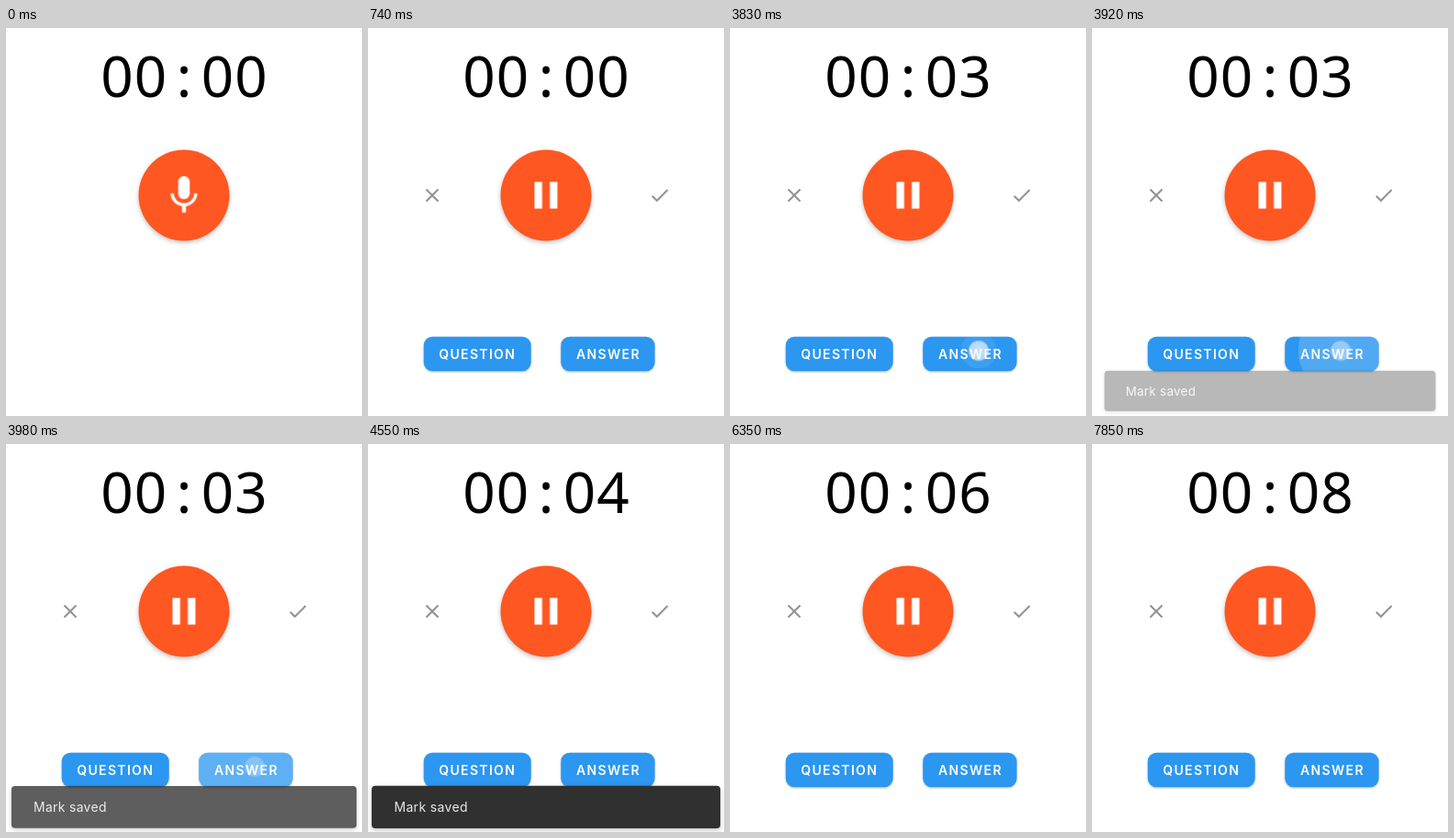
Animation, 388 px wide and 422 px high, one loop 8000 ms. Source, as an HTML page:

```html
<!DOCTYPE html>
<html lang="en">
<head>
<meta charset="utf-8">
<title>Voice recorder</title>
<style>
  html, body { margin: 0; width: 100%; height: 100%; overflow: hidden; background: #fff; }
  svg { display: block; width: 388px; height: 422px; }

  .clock { font: 400 62px "Noto Sans", "Open Sans", sans-serif; font-stretch: 94%; text-anchor: middle; }
  .label { font: 600 14px Inter, Roboto, sans-serif; letter-spacing: 1.35px; fill: #fff; }
  .note { font: 400 14px Inter, Roboto, sans-serif; letter-spacing: .35px; fill: #e8e8e8; }
  .raised { filter: drop-shadow(0 2px 2.5px rgba(0, 0, 0, .25)); }
  .low { filter: drop-shadow(0 1px 1px rgba(0, 0, 0, .22)); }

  .reel, .idle, .active, .dot, .ripple, .snack {
    animation: 8s linear infinite;
    transform-box: fill-box;
    transform-origin: center;
  }
  .reel { animation-name: count; animation-timing-function: step-end; }
  .idle { animation-name: leave; animation-timing-function: step-end; }
  .active { animation-name: enter; animation-timing-function: step-end; }
  .dot.start { animation-name: start-dot; }
  .ripple.start { animation-name: start-ripple; }
  .dot.mark { animation-name: mark-dot; }
  .ripple.mark { animation-name: mark-ripple; }
  .snack { animation-name: snack-fade, snack-grow; }

  /* one second of the counter takes 900 ms */
  @keyframes count {
    0% { transform: translateY(0); }
    19% { transform: translateY(-70px); }
    30.25% { transform: translateY(-140px); }
    41.5% { transform: translateY(-210px); }
    52.75% { transform: translateY(-280px); }
    64% { transform: translateY(-350px); }
    75.25% { transform: translateY(-420px); }
    86.5% { transform: translateY(-490px); }
    97.75%, 100% { transform: translateY(-560px); }
  }
  @keyframes leave { 0% { opacity: 1; } 7.75%, 100% { opacity: 0; } }
  @keyframes enter { 0% { opacity: 0; } 7.75%, 100% { opacity: 1; } }

  @keyframes start-dot {
    0%, 6.2% { opacity: 0; }
    7%, 8.125% { opacity: 1; }
    9.25%, 100% { opacity: 0; }
  }
  @keyframes start-ripple {
    0%, 6.75% { opacity: 0; transform: scale(.2); }
    8.25% { opacity: .24; transform: scale(1); }
    9.25%, 100% { opacity: 0; transform: scale(1); }
  }
  @keyframes mark-dot {
    0%, 45.5% { opacity: 0; }
    46.375%, 47.875% { opacity: 1; }
    49.75%, 51.62% { opacity: .4; }
    51.625%, 100% { opacity: 0; }
  }
  @keyframes mark-ripple {
    0%, 47.125% { opacity: 0; transform: scale(.12); }
    47.875% { opacity: .08; transform: scale(.3); }
    49.75%, 51.62% { opacity: .24; transform: scale(1); }
    51.625% { opacity: .18; }
    52.75%, 100% { opacity: 0; transform: scale(1); }
  }
  @keyframes snack-fade {
    0%, 48.4375% { opacity: 0; }
    49.75%, 51.62% { opacity: .78; }
    51.625% { opacity: .95; }
    52%, 58.5625% { opacity: 1; }
    59.5%, 100% { opacity: 0; }
  }
  @keyframes snack-grow {
    0% { transform: scale(.8); }
    48.4375% { transform: scale(.8); animation-timing-function: cubic-bezier(0, 0, .2, 1); }
    49.75%, 51.62% { transform: scale(.99); }
    52%, 100% { transform: scale(1); }
  }
</style>
</head>
<body>
<svg viewBox="0 0 388 422">
  <defs>
    <radialGradient id="touch">
      <stop offset="0" stop-color="#fff" stop-opacity=".72"/>
      <stop offset=".82" stop-color="#f4f6f8" stop-opacity=".66"/>
      <stop offset="1" stop-color="#e4e8ec" stop-opacity="0"/>
    </radialGradient>
    <clipPath id="digit"><rect x="245" y="20" width="50" height="66"/></clipPath>
    <clipPath id="round"><circle cx="194" cy="182" r="49.5"/></clipPath>
    <clipPath id="answer"><rect x="210.2" y="335.7" width="102.4" height="37.6" rx="9.5"/></clipPath>
  </defs>

  <g class="clock">
    <text x="121 157.5 194 230.5" y="74.8">00:0</text>
    <g clip-path="url(#digit)">
      <text class="reel" x="267 267 267 267 267 267 267 267 267"
        y="74.8 144.8 214.8 284.8 354.8 424.8 494.8 564.8 634.8">012345678</text>
    </g>
  </g>

  <circle class="raised" cx="194" cy="182" r="49.5" fill="#ff5722"/>
  <g clip-path="url(#round)">
    <circle class="ripple start" cx="194" cy="182" r="52" fill="#fff"/>
  </g>
  <g transform="translate(169 157) scale(2.08)" fill="#fff">
    <path class="idle" d="M12 14c1.66 0 3-1.34 3-3V5c0-1.66-1.34-3-3-3S9 3.34 9 5v6c0 1.66 1.34 3 3 3zm5.3-3c0 3-2.54 5.1-5.3 5.1S6.7 14 6.7 11H5c0 3.41 2.72 6.23 6 6.72V21h2v-3.28c3.28-.48 6-3.3 6-6.72z"/>
    <path class="active" d="M6 19h4V5H6zM14 5v14h4V5z"/>
  </g>
  <circle class="dot start" cx="196" cy="186" r="12" fill="url(#touch)"/>

  <g class="active">
    <g fill="#949494">
      <path transform="translate(57.5 169.5) scale(1.04)" d="M19 6.41 17.59 5 12 10.59 6.41 5 5 6.41 10.59 12 5 17.59 6.41 19 12 13.41 17.59 19 19 17.59 13.41 12z"/>
      <path transform="translate(305.5 169.5) scale(1.04)" d="M9 16.17 4.83 12l-1.42 1.41L9 19 21 7l-1.41-1.41z"/>
    </g>
    <g class="low" fill="#2b97f1">
      <rect x="60.7" y="335.7" width="117" height="37.6" rx="9.5"/>
      <rect x="210.2" y="335.7" width="102.4" height="37.6" rx="9.5"/>
    </g>
    <g clip-path="url(#answer)">
      <circle class="ripple mark" cx="271" cy="351" r="64" fill="#fff"/>
    </g>
    <text class="label" x="77.3" y="359.7">QUESTION</text>
    <text class="label" x="227" y="359.7">ANSWER</text>
    <circle class="dot mark" cx="271" cy="351" r="12" fill="url(#touch)"/>
  </g>

  <g class="snack">
    <rect class="raised" x="4" y="371.7" width="380" height="46.3" rx="4" fill="#303030"/>
    <text class="note" x="28.4" y="399.8">Mark saved</text>
  </g>
</svg>
</body>
</html>
```
